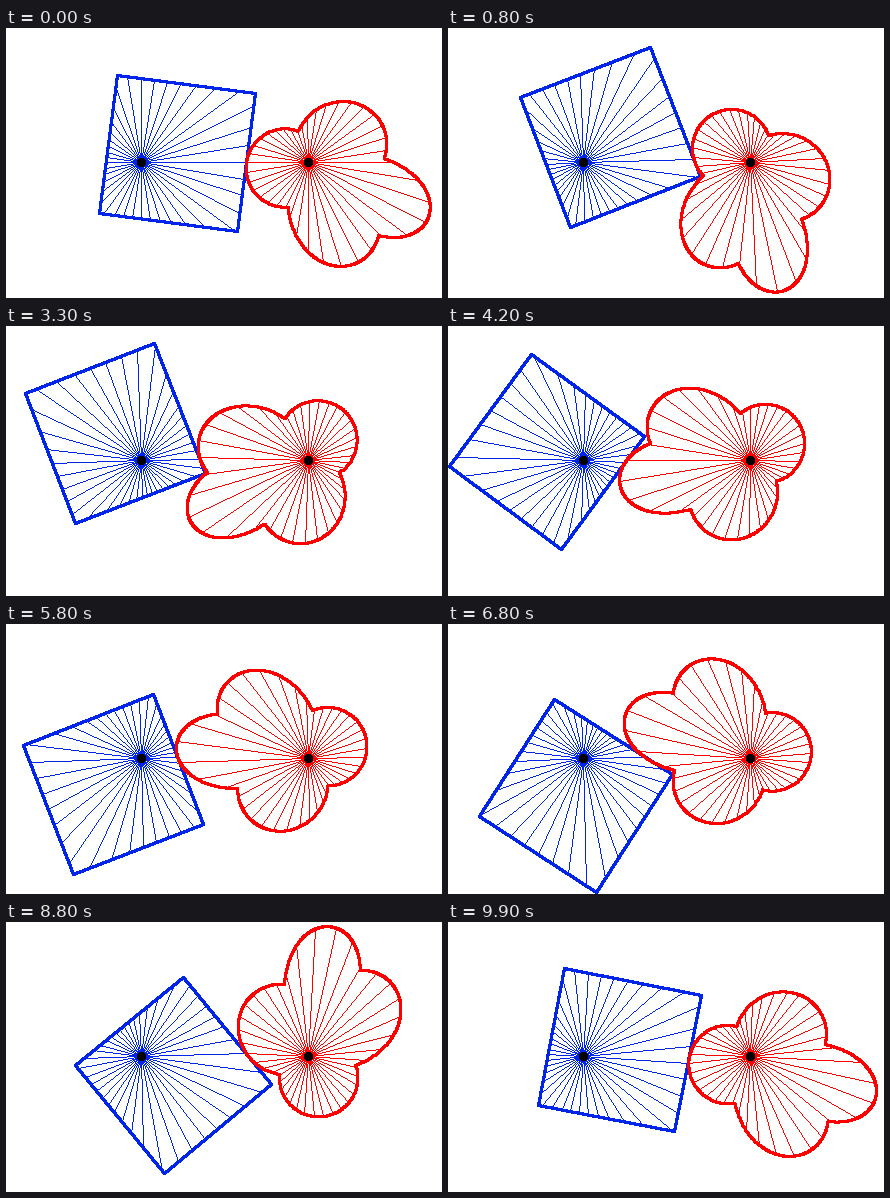
These frames come from a looping animation (436 px wide and 270 px high, 10000 ms). An HTML page with a canvas:

```html
<!DOCTYPE html>
<html lang="en">
<head>
<meta charset="utf-8">
<title>Conjugate gears</title>
<style>
  html, body { margin: 0; width: 100%; height: 100%; overflow: hidden; background: #fff; }
  canvas { display: block; }
</style>
</head>
<body>
<canvas width="436" height="270"></canvas>
<script>
  const TAU = 2 * Math.PI;
  const SAMPLES = 3600, SPOKES = 40, STEPS = 100, STEP_MS = 100;
  const LEFT_X = 135, RIGHT_X = 302, AXIS_Y = 134;
  const TILT = 7.5 * Math.PI / 180;
  const EPS = 1e-6;
  // Pivot distances to the right, bottom, left and top sides of the square
  const SIDES = [105, 56, 35, 84];

  const range = n => Array.from({ length: n }, (_, i) => i);

  const squareRadius = angle => Math.min(...SIDES.map((h, i) => {
    const c = Math.cos(angle - TILT - i * TAU / 4);
    return c > 1e-9 ? h / c : Infinity;
  }));

  const step = TAU / SAMPLES;
  const mids = range(SAMPLES).map(i => squareRadius((i + 0.5) * step));
  const fullTurn = gap => mids.reduce((sum, r) => sum + step * r / (gap - r), 0);

  // The gap at which one turn of the square turns its mate exactly once
  let low = 140, high = 220;
  for (let i = 0; i < 40; i++) {
    const mid = (low + high) / 2;
    if (fullTurn(mid) > TAU) low = mid; else high = mid;
  }
  const gap = high;
  const scale = (RIGHT_X - LEFT_X) / gap;

  // Turn of the mate for each sampled turn of the square
  const turn = [0];
  mids.forEach((r, i) => turn.push(turn[i] + step * r / (gap - r)));

  const polar = (radius, angle) => ({ radius: radius * scale, angle });
  const squareAt = i => polar(squareRadius(i * step), i * step);
  const lobeAt = i => polar(gap - squareRadius(i * step), Math.PI - turn[i]);

  const square = {
    x: LEFT_X, color: '#0024e8',
    rim: range(4).map(i => {
      const a = SIDES[i], b = SIDES[(i + 1) % 4];
      return polar(Math.hypot(a, b), TILT + i * TAU / 4 + Math.atan2(b, a));
    }),
    spokes: range(SPOKES).map(k => squareAt(k * SAMPLES / SPOKES))
  };
  const lobes = {
    x: RIGHT_X, color: '#f00',
    rim: range(SAMPLES / 5).map(i => lobeAt(i * 5)),
    spokes: range(SPOKES).map(k => lobeAt(turn.findIndex(t => t >= k * TAU / SPOKES - EPS)))
  };

  const ctx = document.querySelector('canvas').getContext('2d');

  // Hard-edged line drawn with a square brush
  function line([x0, y0], [x1, y1], size) {
    const n = Math.max(Math.abs(x1 - x0), Math.abs(y1 - y0), 1);
    const half = (size - 1) / 2;
    for (let i = 0; i <= n; i++) {
      const x = Math.round(x0 + (x1 - x0) * i / n);
      const y = Math.round(y0 + (y1 - y0) * i / n);
      ctx.fillRect(x - half, y - half, size, size);
    }
  }

  function hub(x) {
    ctx.fillStyle = '#000';
    for (let dy = -4; dy <= 4; dy++) {
      const w = Math.floor(Math.sqrt(4.7 ** 2 - dy * dy));
      ctx.fillRect(x - w, AXIS_Y + dy, 2 * w + 1, 1);
    }
  }

  function drawGear(gear, rotation) {
    // Whole pixels, rounded down on axes where y points up
    const pixel = ({ radius, angle }) => [
      gear.x + Math.floor(radius * Math.cos(angle + rotation) + EPS),
      AXIS_Y + Math.ceil(radius * Math.sin(angle + rotation) - EPS)
    ];
    ctx.fillStyle = gear.color;
    gear.spokes.forEach(p => line([gear.x, AXIS_Y], pixel(p), 1));
    const rim = gear.rim.map(pixel);
    rim.forEach((p, i) => line(p, rim[(i + 1) % rim.length], 3));
    hub(gear.x);
  }

  let shown = -1;
  function draw() {
    const n = Math.floor(performance.now() / STEP_MS) % STEPS;
    if (n !== shown) {
      shown = n;
      ctx.clearRect(0, 0, 436, 270);
      drawGear(square, -n * TAU / STEPS);
      drawGear(lobes, turn[n * SAMPLES / STEPS]);
    }
    requestAnimationFrame(draw);
  }
  draw();
</script>
</body>
</html>
```
